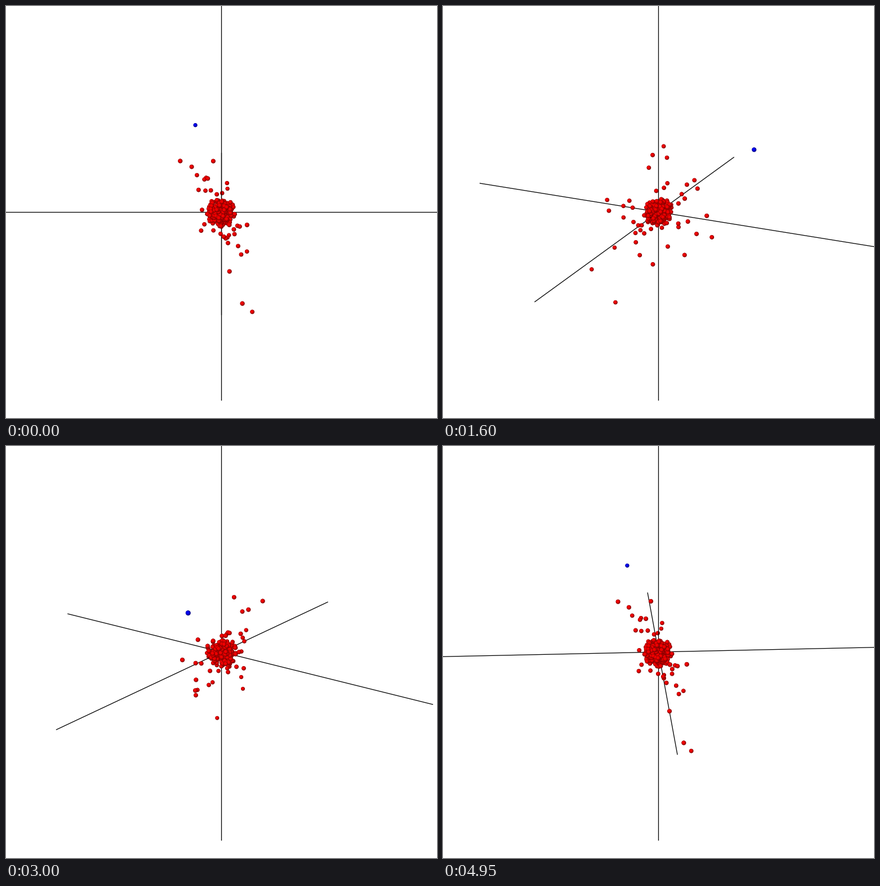
Write a matplotlib script that moves like this. It is 765 by 732 pixels and loops after 5 s.

```python
import numpy as np
import matplotlib.pyplot as plt
from matplotlib.animation import FuncAnimation

W, H, DPI = 765, 732, 100
FRAMES, INTERVAL = 100, 50
PX = 72 / DPI                                   # one pixel in points

# Camera: 30 degree view angle, raised 20 degrees, aimed at the origin
FOCAL = H / 2 / np.tan(np.radians(15))
DIST = 3.5
COS_E, SIN_E = np.cos(np.radians(20)), np.sin(np.radians(20))
RADIUS = 0.01

# x to the right, y towards the viewer, z up
OUTLIERS = np.array([
    (-.180, .058, .258), (-.132, .019, .220), (-.114, -.127, .136),
    (-.036, .046, .254), (-.079, -.105, .122), (-.072, -.160, .113),
    (-.060, .077, .184), (-.103, .003, .107), (-.074, -.082, .075),
    (-.048, -.005, .102), (.026, -.140, .093), (.029, -.247, .030),
    (.110, .196, .012), (-.092, .046, -.073), (-.078, .008, -.057),
    (-.088, .013, .015), (.059, .044, -.091), (.075, .079, -.135),
    (.119, -.028, -.207), (.090, .052, -.188), (.035, .212, -.200),
    (.090, .308, -.308), (.140, .156, -.427), (.029, .104, -.110),
    (.036, -.147, -.172), (.028, -.060, -.149), (.082, .062, -.047),
    (.072, .050, -.048), (-.037, .000, -.090), (-.004, .040, -.091),
    (.055, .100, -.046), (.019, .083, -.096), (.033, .247, .032),
    (-.002, .181, .001), (-.011, .154, .028), (.010, .175, -.051),
    (.001, -.189, -.075), (-.040, -.247, -.096), (.027, -.157, -.012),
    (.030, -.112, -.028), (.003, -.100, .057), (-.007, -.097, -.060),
    (.023, .120, .010), (-.021, .021, .092),
])
BLUE_BALL = np.array([[-.128, -.399, .308]])


def core(count, size):
    """Dense ball of points around the origin."""
    rng = np.random.default_rng(7)
    ways = rng.normal(size=(count, 3))
    ways /= np.linalg.norm(ways, axis=1, keepdims=True)
    return ways * size * rng.random((count, 1)) ** 0.55


BALLS = np.vstack([BLUE_BALL, OUTLIERS, core(255, 0.068)])
HUES = np.array([(0, 0, 1)] + [(1, 0, 0)] * (len(BALLS) - 1), float)

# Shading rings of a ball: relative size, shift in radii, brightness
RINGS = [(1.0, 0.0, 0.50), (0.84, -0.09, 0.76), (0.60, -0.18, 0.94)]

HALF_AXES = np.vstack([np.eye(3), -np.eye(3)])


def project(points, angle):
    """Turn about the vertical axis; return screen x, y and depth."""
    x, y, z = points.T
    c, s = np.cos(angle), np.sin(angle)
    side, near = x * c - y * s, x * s + y * c
    depth = DIST - near * COS_E - z * SIN_E
    scale = FOCAL / depth
    return (W / 2 + side * scale,
            H / 2 - (z * COS_E - near * SIN_E) * scale,
            depth)


fig = plt.figure(figsize=(W / DPI, H / DPI), dpi=DPI, facecolor="white")
ax = fig.add_axes([0, 0, 1, 1])
ax.set_xlim(0, W)
ax.set_ylim(H, 0)
ax.axis("off")

lines = [ax.plot([], [], color="black", lw=1.3 * PX)[0] for _ in HALF_AXES]
back = ax.scatter([], [], linewidths=0, zorder=2)
front = ax.scatter([], [], linewidths=0, zorder=4)


def place(layer, x, y, depth, hues):
    """Fill a layer with shaded balls, farthest first."""
    order = np.argsort(-depth)
    x, y, hues = x[order], y[order], hues[order]
    r = FOCAL * RADIUS / depth[order]
    spots = [np.column_stack([x + r * d, y + r * d]) for _, d, _ in RINGS]
    sizes = [(2 * r * k * PX) ** 2 for k, _, _ in RINGS]
    tints = [hues * b for _, _, b in RINGS]
    layer.set_offsets(np.stack(spots, 1).reshape(-1, 2))
    layer.set_sizes(np.stack(sizes, 1).ravel())
    layer.set_facecolor(np.stack(tints, 1).reshape(-1, 3))


def update(frame):
    angle = 2 * np.pi * frame / FRAMES
    for line, x, y, depth in zip(lines, *project(HALF_AXES, angle)):
        line.set_data([W / 2, x], [H / 2, y])
        line.set_zorder(3 if depth < DIST else 1)
    x, y, depth = project(BALLS, angle)
    for layer, mask in ((back, depth >= DIST), (front, depth < DIST)):
        place(layer, x[mask], y[mask], depth[mask], HUES[mask])
    return [*lines, back, front]


anim = FuncAnimation(fig, update, frames=FRAMES, interval=INTERVAL,
                     repeat=True, repeat_delay=0)
plt.show()
```
